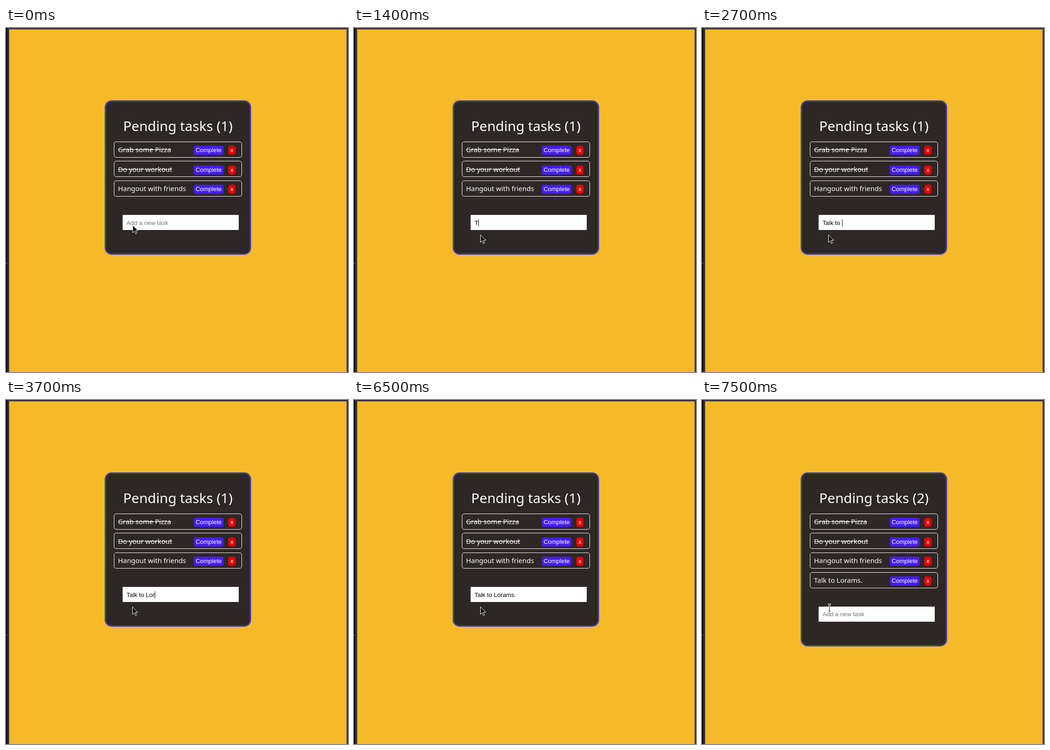
These frames come from a looping animation (745 px wide and 751 px high, 8000 ms). An HTML page:

```html
<!DOCTYPE html>
<html lang="en">
<head>
<meta charset="utf-8">
<title>Pending tasks</title>
<style>
  html, body { margin: 0; width: 100%; height: 100%; overflow: hidden; }
  body { position: relative; background: #f6b928; color: #fff; font: 14.9px/20px "Noto Sans", sans-serif; }
  body * { position: absolute; box-sizing: border-box; white-space: pre; }
  #top { left: 0; top: 0; width: 745px; height: 3px; background: #37363b; }
  #left { left: 0; top: 0; width: 7px; height: 751px; background: #38373d; border-left: 3px solid #090817; }
  #right { left: 742px; top: 0; width: 3px; height: 751px; background: #37363b; }
  #speck { left: 0; top: 513px; width: 2px; height: 1px; background: #aaa; }
  #card { left: 215px; top: 158px; width: 319px; background: #2d2726; border: 3px solid #4040a4; border-radius: 15px; }
  h1 { left: 215px; top: 193px; width: 319px; margin: 0; text-align: center; font-size: 29.8px; line-height: 41px; font-weight: 400; }
  .task { left: 235px; width: 279px; height: 35px; border: 1px solid #fff; border-radius: 5px; }
  .task span { left: 8px; top: 6.3px; }
  .done span { text-decoration: line-through; }
  .task b, #field { font: 13.333px/15px "Liberation Sans", Arial, sans-serif; }
  .task b { top: 8.4px; height: 20px; padding-top: 2px; text-align: center; border-radius: 4px; }
  .ok { left: 173px; width: 65px; background: #451df2; }
  .task .del { left: 248px; width: 16px; background: #e60000; border-radius: 5px; }
  #field { left: 254px; width: 253px; height: 33px; background: #fff; color: #000; }
  #field span { left: 8.4px; top: 9.7px; }
  #hint { color: #757575; }
  #caret { width: 1px; height: 15px; background: #000; }
  svg { left: 0; top: 0; overflow: visible; }
</style>
</head>
<body>
<div id="top"></div><div id="left"></div><div id="right"></div><div id="speck"></div>
<div id="card"></div>
<h1></h1>
<div id="field"><span id="hint">Add a new task</span><span id="line"></span></div>
<svg id="pointer" width="20" height="22">
  <path id="arrow" d="M.5 .5V17L4.3 13.4 7 19.5 9.4 18.4 6.8 12.4H12Z" fill="#0a0a0a" stroke="#fff"/>
  <g id="beam" fill="none">
    <path d="M-3 -7.5H3M-3 7.5H3M0 -7.5V7.5" stroke="#fff" stroke-width="3"/>
    <path d="M-2.5 -7.5H2.5M-2.5 7.5H2.5M0 -7.5V7.5" stroke="#111"/>
  </g>
</svg>
<script>
const $ = s => document.querySelector(s);
const LOOP = 8000, PITCH = 42.67, ADDED = 6900;
const entry = "Talk to Lorams.";
const keys = [1400, 1700, 1900, 2000, 2200, 2400, 2500, 2700, 3400, 3600, 3700, 4000, 4100, 4400, 5800];
const blinks = [500, 1100, 1400, 3300, 3400, 5500, 5600, 6500, 6900, 7500];
// start time, shape, x, y
const moves = [
  [0, "arrow", 275.5, 430],
  [200, "beam", 277.5, 430],
  [700, "arrow", 276, 445],
  [800, "arrow", 275, 451],
  [7000, "beam", 277.5, 453.5]
];

const tasks = ["Grab some Pizza", "Do your workout", "Hangout with friends", entry].map((name, i) => {
  const el = document.createElement("div");
  el.className = i < 2 ? "task done" : "task";
  el.style.top = 247.7 + i * PITCH + "px";
  el.innerHTML = `<span>${name}</span><b class="ok">Complete</b><b class="del">x</b>`;
  $("#field").before(el);
  return el;
});
const caret = document.createElement("i");
caret.id = "caret";

const passed = (times, t) => times.filter(x => x <= t).length;
const show = (el, on) => { el.style.visibility = on ? "visible" : "hidden"; };

function draw(t) {
  const added = t >= ADDED;
  const typed = added ? "" : entry.slice(0, passed(keys, t));
  $("h1").textContent = `Pending tasks (${t < 7000 ? 1 : 2})`;
  $("#card").style.height = (added ? 380 : 337) + "px";
  $("#field").style.top = 407.9 + (added ? PITCH : 0) + "px";
  show(tasks[3], added);
  show($("#hint"), !typed);
  $("#line").replaceChildren(typed, caret);
  show(caret, passed(blinks, t) % 2);

  const [, shape, x, y] = moves.filter(m => m[0] <= t).pop();
  $("#pointer").style.transform = `translate(${x}px, ${y}px)`;
  show($("#arrow"), shape === "arrow");
  show($("#beam"), shape === "beam");
}

const start = performance.now();
function tick() {
  draw((performance.now() - start) % LOOP);
  requestAnimationFrame(tick);
}
tick();
</script>
</body>
</html>
```
